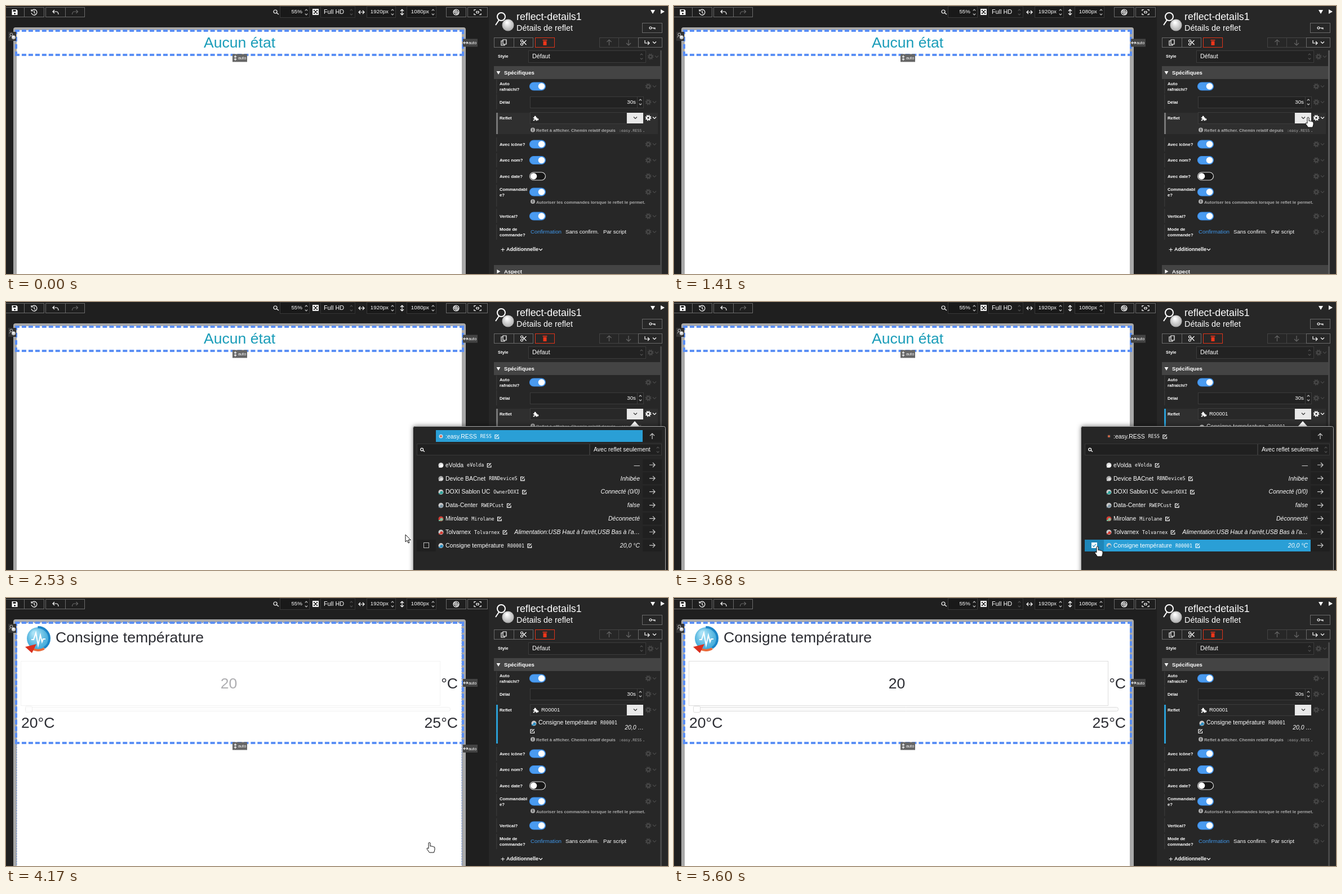
Animation, 1175 px wide and 477 px high, one loop 7.01 s. Source, as an HTML page with a canvas:

```html
<!DOCTYPE html>
<html lang="fr">
<head>
<meta charset="utf-8">
<title>Détails de reflet</title>
<style>
html, body { margin: 0; width: 100%; height: 100%; overflow: hidden; background: #1f1f1f; }
canvas { display: block; }
</style>
</head>
<body>
<canvas id="stage" width="1175" height="477"></canvas>
<script>
const LOOP = 7010, STEP = 70, PICK = 3680, OPEN = 1670;
const BLUE = '#2a9fd6', SELECT = '#5a8ff5', INK = '#2c2d33', DIM = '#484848';
const ctx = document.getElementById('stage').getContext('2d');

const ICON = {
  down: 'M-3-1.5L0 1.5L3-1.5',
  spin: 'M-2.5-3L0-5.5L2.5-3M-2.5 3L0 5.5L2.5 3',
  right: 'M-5 0H5M1-4L5 0L1 4',
  up: 'M0 5V-5M-4-1L0-5L4-1',
  dn: 'M0 5V-5M-4 1L0 5L4 1',
  wide: 'M-5 0H5M-2-3L-5 0L-2 3M2-3L5 0L2 3',
  tall: 'M0-5V5M-3-2L0-5L3-2M-3 2L0 5L3 2',
  edit: 'M1-3H-3V3.5H3.5V0M-1 1L3.5-3.5',
  search: 'M2 0A3 3 0 1 1-4 0A3 3 0 1 1 2 0M1 2L5 5',
  puzzle: 'M-5-2H-2.5A2 2 0 1 1 .5-2H3V.5A2 2 0 1 1 3 3.5V5H.5A1.5 1.5 0 1 0-2 5H-5V2.5A1.5 1.5 0 1 0-5 0Z',
  save: 'M-5-5H3L5-3V5H-5ZM-3-4V-1H2V-4ZM0 1A1.5 1.5 0 1 0 .1 1Z',
  history: 'M-4-3A5 5 0 1 1-5 1M-5-5V-2H-2M0-3V1L2 2',
  undo: 'M-2-4L-5-1L-2 2M-5-1H1Q5-1 5 4',
  redo: 'M2-4L5-1L2 2M5-1H-1Q-5-1-5 4',
  copy: 'M-2-5H4V3H-2ZM-2-3H-5V5H1V3',
  scissors: 'M-1-3A2 2 0 1 1-5-3A2 2 0 1 1-1-3M-1 3A2 2 0 1 1-5 3A2 2 0 1 1-1 3M-1-2L5 4M-1 2L5-4',
  trash: 'M-4-5H4V-3.5H-4ZM-3-2.5H3V5H-3Z',
  enter: 'M-4-4V1H4M1-2L4 1L1 4',
  key: 'M-1 0A2 2 0 1 1-5 0A2 2 0 1 1-1 0H5V2.5M3 0V2',
  rotate: 'M5 0A5 5 0 1 1-5 0A5 5 0 1 1 5 0M-3-3L4 4M-1-4L4 1M-4-1L1 4',
  expand: 'M-6-2V-4.5H-3M6-2V-4.5H3M-6 2V4.5H-3M6 2V4.5H3M-2-1.5H2V1.5H-2Z',
  check: 'M-3 0L-1 2.5L3-2.5',
  triDown: 'M-4-3H4L0 4Z',
  triRight: 'M-3-4V4L4 0Z',
  arrow: 'M0 0V13L3 10.2L5 15L7 14.2L5 9.6H9.3Z',
  hand: 'M0 1Q1.5-1 3 1V7Q5 5.5 6 7.3Q8 6.2 8.7 8Q11 7.2 11 10V13L9.5 18H1.5L-3 11.5Q-3 9-.5 10.5L0 11Z'
};

// [time, x, y] of the pointer's hot spot
const POINTER = [[780, 1075, 468], [1060, 1103, 335], [1250, 1121, 222], [1410, 1124, 198], [1980, 1124, 198],
  [2190, 985, 275], [2400, 762, 385], [2530, 709, 414], [2670, 718, 444], [2880, 738, 451], [3150, 750, 435],
  [4910, 750, 435], [5120, 835, 442], [5330, 1010, 466], [5400, 1060, 490]];

const DEVICES = [
  ['eVolda', 'eVolda', '—', '#ddd', '#fff'],
  ['Device BACnet', 'RBNDeviceS', 'Inhibée', '#aaa', '#ddd'],
  ['DOXI Sablon UC', 'OwnerDOXI', 'Connecté (0/0)', '#ccc', '#2fa39a'],
  ['Data-Center', 'RWEPCust', 'false', '#ccc', '#7f97a5'],
  ['Mirolane', 'Mirolane', 'Déconnecté', '#d43c34', '#7fc3a0'],
  ['Tolvarnex', 'Tolvarnex', "Alimentation:USB Haut à l'arrêt,USB Bas à l'a…", '#ccc', '#d43c34'],
  ['Consigne température', 'R00001', '20,0 °C', '#ccc', '#2b8fc4']
];

// label lines, centre, top, bottom, kind
const ROWS = [
  [['Auto', 'rafraîchi?'], 143, 131, 156, 'on'],
  [['Délai'], 171, 157, 184, 'delay'],
  [['Reflet'], 199, 190, 228, 'reflect'],
  [['Avec icône?'], 246, 234, 259, 'on'],
  [['Avec nom?'], 274.5, 262, 287, 'on'],
  [['Avec date?'], 303, 291, 315, 'off'],
  [['Commandabl', 'e?'], 331, 318, 357, 'on'],
  [['Vertical?'], 374, 361, 386, 'on'],
  [['Mode de', 'commande?'], 402, 389, 416, 'mode']
];

function box(x, y, w, h, fill, stroke, width = 1) {
  if (fill) { ctx.fillStyle = fill; ctx.fillRect(x, y, w, h); }
  if (stroke) { ctx.strokeStyle = stroke; ctx.lineWidth = width; ctx.strokeRect(x + .5, y + .5, w - 1, h - 1); }
}

function round(x, y, w, h, r, fill, stroke, width = 1) {
  ctx.beginPath();
  ctx.roundRect(x, y, w, h, r);
  ctx.fillStyle = fill;
  ctx.fill();
  if (stroke) { ctx.strokeStyle = stroke; ctx.lineWidth = width; ctx.stroke(); }
}

const disc = (x, y, r, fill, stroke, width) => round(x - r, y - r, 2 * r, 2 * r, r, fill, stroke, width);

// A line of dashes that starts and ends with a whole dash
function dashes(x0, y0, x1, y1, width) {
  const length = Math.hypot(x1 - x0, y1 - y0), dash = 2 * width;
  const count = Math.round((length + width) / (dash + width));
  ctx.setLineDash(count > 1 ? [dash, (length - count * dash) / (count - 1)] : []);
  ctx.lineWidth = width;
  ctx.beginPath();
  ctx.moveTo(x0, y0);
  ctx.lineTo(x1, y1);
  ctx.stroke();
  ctx.setLineDash([]);
}

function dashedFrame(x, y, w, h, color, width) {
  const m = width / 2;
  ctx.strokeStyle = color;
  dashes(x, y + m, x + w, y + m, width);
  dashes(x, y + h - m, x + w, y + h - m, width);
  dashes(x + m, y, x + m, y + h, width);
  dashes(x + w - m, y, x + w - m, y + h, width);
}

// y is the middle of the capitals; returns the right end
function text(s, x, y, size, color = '#fff', align = 'left', style = '', family = '"Liberation Sans", Arial, sans-serif') {
  ctx.font = `${style} ${size}px ${family}`;
  ctx.textAlign = align;
  ctx.fillStyle = color;
  ctx.fillText(s, x, y + size * .35);
  return x + ctx.measureText(s).width;
}

const bold = (s, x, y, color, size = 7.75) => text(s, x, y, size, color, 'left', 'bold');
const mono = (s, x, y, size, color) => text(s, x, y, size, color, 'left', '', '"DejaVu Sans Mono", monospace');

function icon(name, x, y, color = '#fff', filled = false, scale = 1, width = 1.2) {
  ctx.save();
  ctx.translate(x, y);
  ctx.scale(scale, scale);
  const path = new Path2D(ICON[name]);
  ctx.fillStyle = ctx.strokeStyle = color;
  ctx.lineWidth = width;
  filled ? ctx.fill(path, 'evenodd') : ctx.stroke(path);
  ctx.restore();
}

function button(x, y, w, name, color = '#fff', filled, border = '#6a6a6a') {
  box(x, y, w, 18, null, border);
  icon(name, x + w / 2, y + 9, color, filled);
}

function gear(x, y, color) {
  ctx.strokeStyle = color;
  ctx.lineWidth = 2;
  for (const [r, dash] of [[2.8, []], [4.4, [1.8, 1.65]]]) {
    ctx.setLineDash(dash);
    ctx.beginPath();
    ctx.arc(x, y, r, 0, 7);
    ctx.stroke();
  }
  ctx.setLineDash([]);
  icon('down', x + 11, y, color);
}

function toggle(y, on) {
  round(929.5, y - 7, 28, 14, 7, on ? '#4a9bf0' : '#161616', on ? '#3d8de6' : '#ddd', 1.2);
  disc(on ? 950.5 : 936.5, y, 5.8, '#fff');
}

function info(s, y) {
  disc(935, y - 1, 4, '#aaa');
  bold('i', 934, y - 1, '#222', 7);
  return bold(s, 941, y, '#aaa');
}

function smallIcon(x, y, base, tint) {
  disc(x, y, 4.5, base);
  disc(x + 1, y + 1, 2.6, tint);
  box(x - 4, y + 2, 3, 2, tint);
}

function lens(x, y, k) {
  ctx.save();
  ctx.translate(x, y);
  ctx.scale(k, k);
  ctx.strokeStyle = '#fff';
  ctx.lineWidth = 2;
  ctx.beginPath();
  ctx.arc(10, 8, 7, 0, 7);
  ctx.moveTo(6, 14);
  ctx.lineTo(0, 23);
  ctx.stroke();
  const shine = ctx.createRadialGradient(20, 18, 1, 22, 22, 12);
  shine.addColorStop(0, '#fff');
  shine.addColorStop(1, '#aaa');
  disc(22, 23, 10.5, shine);
  ctx.restore();
}

function toolbar() {
  button(-2, 2, 35, 'save', '#fff', true);
  button(32, 2, 36, 'history');
  button(70, 2, 36, 'undo');
  button(105, 2, 35, 'redo', '#666');
  icon('search', 479, 10);
  for (const [x, w, s] of [[486, 53, '55%'], [640, 52, '1920px'], [711, 53, '1080px']]) {
    box(x, 0, w, 21, '#191919', '#383838');
    text(s, x + w - 13, 10, 9.8, '#fff', 'right');
    icon('spin', x + w - 6, 11, '#ccc', false, .9);
  }
  box(544, 5, 11, 11, '#eee');
  for (const [x, y] of [[546, 7], [551, 7], [546, 12], [551, 12]]) box(x, y, 2, 2, '#222');
  box(548, 9, 3, 3, '#222');
  box(558, 0, 62, 21, '#1c1c1c', '#333');
  text('Full HD', 564, 10.5, 10.8);
  icon('spin', 613, 11, '#555', false, .9);
  icon('wide', 631, 11);
  icon('tall', 703, 11);
  button(781, 2, 36, 'rotate');
  button(819, 2, 36, 'expand');
}

function tag(x, y, name, fill) {
  box(x, y - 7, 26, 14, fill);
  icon(name, x + 5, y, '#fff', false, .75, 1.4);
  text('auto', x + 10, y, 7.3);
}

function thermoIcon() {
  const ball = ctx.createRadialGradient(50, 62, 3, 57, 72, 24);
  ball.addColorStop(0, '#a9e2f6');
  ball.addColorStop(1, '#2c9fd4');
  disc(57, 72, 20, ball);
  ctx.strokeStyle = '#1d86c8';
  ctx.lineWidth = 4;
  ctx.beginPath();
  ctx.arc(57, 72, 20, -1.6, 1);
  ctx.stroke();
  ctx.strokeStyle = '#e86a3a';
  ctx.beginPath();
  ctx.arc(57, 73, 20, 1, 2.2);
  ctx.stroke();
  ctx.fillStyle = '#d9301f';
  ctx.fill(new Path2D('M34 87L54 82L46 98Z'));
  ctx.strokeStyle = '#fff';
  ctx.lineWidth = 2;
  ctx.stroke(new Path2D('M45 74H49L53 62L57 84L61 66L64 78L66 73H70'));
}

function widget(alpha) {
  thermoIcon();
  text('Consigne température', 88, 70, 26.6, INK);
  ctx.globalAlpha = alpha;
  box(26, 112, 745, 80, '#fff', '#ddd');
  text('20', 395.5, 152, 26.6, INK, 'center');
  round(34.5, 194.5, 754, 7, 3, '#fafafa', '#ddd');
  round(34.5, 192.5, 12, 11, 2, '#fff', '#ddd');
  ctx.globalAlpha = 1;
  text('°C', 802, 152, 26.6, INK, 'right');
  text('20°C', 27, 222, 26.6, INK);
  text('25°C', 802, 222, 26.6, INK, 'right');
}

function page(phase, hovered) {
  round(13, 38, 803, 460, 4, '#a9a9a9');
  box(19, 43, 790, 450, '#fff');
  const bottom = phase < 2 ? 87 : phase < 5 ? 47.5 : 258;
  if (phase < 2) text('Aucun état', 414.5, 65, 26.6, '#1b9db9', 'center');
  if (phase >= 5) widget(Math.min(1, (phase - 4.8) * .175));
  if (hovered) {
    dashedFrame(18, 43, 792, 450, '#7c93c4', 1.5);
    tag(811, 268, 'wide', '#444');
  }
  dashedFrame(16, 42, 797, bottom - 40, SELECT, 4);
  tag(402, bottom + 5.5, 'tall', '#666');
  tag(811, (bottom + 44) / 2, 'wide', '#444');
  box(4, 46, 14, 16, '#333');
  lens(6, 48, .34);
}

function panelHeader() {
  lens(869, 11, 1);
  text('reflect-details1', 906, 18.5, 17.8);
  text('Détails de reflet', 906, 38.5, 14.4);
  icon('triDown', 1148, 10, '#fff', true);
  icon('triRight', 1165, 10, '#fff', true);
  button(1129, 30, 36, 'key');
  button(866, 56, 36, 'copy');
  button(901, 56, 35, 'scissors');
  button(939, 56, 35, 'trash', '#f0351a', true, '#e0341a');
  button(1053, 56, 35, 'up', '#666', false, '#444');
  button(1087, 56, 36, 'dn', '#666', false, '#444');
  box(1122, 56, 43, 18, null, '#6a6a6a');
  icon('enter', 1138, 65);
  icon('down', 1151, 65);
  bold('Style', 873, 89.5);
  box(927, 79, 209, 22, '#222', '#3c3c3c');
  text('Défaut', 934, 89.5, 10.8);
  icon('spin', 1128, 90, '#555', false, .9);
  gear(1144, 90, DIM);
}

function section(title, y, name) {
  box(866, y, 295, 23, '#444');
  icon(name, 874, y + 11.5, '#fff', true, .85);
  bold(title, 884, y + 11.5, '#fff', 9.6);
}

function reflectField(y, chosen) {
  box(930, y - 10, 172, 21, '#282828', '#3c3c3c');
  icon('puzzle', 940, y + 1, '#fff', true, .85);
  box(1102, y - 9, 29, 19, '#e9e9e9');
  icon('down', 1117, y, '#333');
  if (chosen) {
    text('R00001', 950, y, 9.5);
    smallIcon(937, 223, '#ccc', '#2b8fc4');
    text('Consigne température', 945, 221.5, 10.5);
    mono('R00001', 1055, 222, 8.3);
    icon('edit', 934, 237);
    text('20,0 …', 1132, 230, 10.5, '#fff', 'right', 'italic');
  }
  const helpY = chosen ? 252.5 : 221.5;
  info('Reflet à afficher. Chemin relatif depuis', helpY);
  mono(':easy.RESS', 1088, helpY, 6.7, '#aaa');
  bold('.', 1131, helpY, '#aaa');
}

function panel(chosen, hoverAt, barHot) {
  box(857, 0, 318, 477, '#272727');
  panelHeader();
  section('Spécifiques', 107, 'triDown');
  ROWS.forEach(([lines, mid, top, bottom, kind], i) => {
    const shift = chosen && i > 2 ? 31 : 0, y = mid + shift;
    const end = bottom + shift + (chosen && i === 2 ? 31 : 0);
    const hot = hoverAt >= top + shift && hoverAt <= end;
    if (hot) box(870, top + shift, 287, end - top - shift, '#2f2f2f');
    const picked = chosen && kind === 'reflect';
    box(870, top + shift, hot || picked ? 3 : 1.5, end - top - shift, picked ? BLUE : hot ? '#777' : '#363636');
    lines.forEach((s, n) => bold(s, 876, y + (n - (lines.length - 1) / 2) * 9.6));
    gear(1140, y, hot ? '#fff' : DIM);
    if (kind === 'on' || kind === 'off') toggle(y, kind === 'on');
    if (kind === 'delay') {
      box(930, 161, 202, 21, '#222', '#3c3c3c');
      box(1120, 162, 1, 19, '#3c3c3c');
      text('30s', 1118, y, 9.8, '#fff', 'right');
      icon('spin', 1126, y, '#ccc', false, .9);
    }
    if (kind === 'reflect') reflectField(y, chosen);
    if (kind === 'mode') {
      text('Confirmation', 931, y, 9.7, '#3f97ea');
      text('Sans confirm.', 993, y, 9.7);
      text('Par script', 1060, y, 9.7);
    }
  });
  const shift = chosen ? 31 : 0;
  info('Autoriser les commandes lorsque le reflet le permet.', 349 + shift);
  text('+', 878, 433 + shift, 13);
  icon('down', bold('Additionnelle', 888, 433 + shift, '#fff', 9) + 4, 433.5 + shift);
  section('Aspect', 461 + shift, 'triRight');
  box(1161, 79, 3, 398, barHot ? '#5a5a5a' : '#484848');
}

function named(name, code, y, ink) {
  const end = mono(code, text(name, 780, y, 10.5, ink) + 6, y + .5, 8.4, ink);
  icon('edit', end + 9, y + .5, ink);
}

function popup(alpha, chosen, cellHot) {
  const ghost = alpha < .3, ink = ghost ? '#000' : '#fff';
  ctx.save();
  ctx.globalAlpha = alpha;
  ctx.fillStyle = ink;
  ctx.fill(new Path2D('M1108 221L1116 212L1124 221Z'));
  if (!ghost) { ctx.shadowColor = '#0008'; ctx.shadowBlur = 8; }
  round(723, 221, 448, 270, 3, '#262626');
  ctx.shadowBlur = 0;
  if (!ghost) round(722.5, 221.5, 448, 270, 3, '#262626', '#aaa');
  if (!chosen) box(763, 228, 367, 21, BLUE);
  disc(772, 239, 3.5, chosen ? '#333' : '#cde');
  disc(772, 239, 2, '#d96b4a');
  named(':easy.RESS', 'RESS', 239, ink);
  box(1130, 228, 34, 21, '#202020');
  icon('up', 1147, 239, ghost ? ink : '#ccc');
  box(729, 252, 307, 21, '#202020', '#383838');
  icon('search', 739, 262.5, ink, false, .8, 1.6);
  box(1036, 252, 128, 21, '#202020', '#383838');
  text('Avec reflet seulement', 1043, 262.5, 10.5, ink);
  icon('spin', 1157, 263, '#555', false, .9);
  DEVICES.forEach(([name, code, value, base, tint], i) => {
    const y = 290 + i * 23.85, last = i === 6;
    if (last) {
      box(729, 423, 34, 21, chosen ? '#1f86b8' : cellHot ? '#363636' : '#202020');
      if (chosen) box(763, 423, 367, 21, BLUE);
      box(741, 428, 10, 10, chosen ? '#fff' : null, chosen ? ink : '#bbb');
      if (chosen) icon('check', 746, 433, '#1f86b8');
    }
    smallIcon(772, y + .5, base, tint);
    named(name, code, y, ink);
    text(value, 1125, y, 10.5, ink, 'right', 'italic');
    box(1130, Math.round(y - 10.5), 34, 21, '#202020');
    icon('right', 1147, y, ghost ? ink : '#ccc');
  });
  ctx.restore();
}

function pointerAt(t) {
  const i = POINTER.findIndex(p => p[0] > t);
  if (i < 1) return null;
  const [t0, x0, y0] = POINTER[i - 1], [t1, x1, y1] = POINTER[i];
  const u = (t - t0) / (t1 - t0);
  return { x: x0 + (x1 - x0) * u, y: y0 + (y1 - y0) * u };
}

function drawPointer({ x, y }, hand) {
  const name = hand ? 'hand' : 'arrow';
  icon(name, x, y, '#fff', true);
  icon(name, x, y, '#111', false, 1, 1);
}

function draw(t) {
  const step = 10 + STEP * Math.floor((t - 10) / STEP);
  const phase = Math.floor((t - PICK) / STEP);
  const pointer = pointerAt(step);
  const chosen = t >= PICK;
  const overPanel = pointer && pointer.x > 857 && (t < OPEN || t > 4980);
  const hoverAt = overPanel ? Math.max(pointer.y, t < OPEN && pointer.y < 230 ? 199 : 0)
    : t < 780 || (t >= OPEN && phase < 3) ? 199 : -1;
  const opacity = t < OPEN ? 0 : phase < 1 ? 1 : [0, .5, .08][phase] || 0;

  box(0, 0, 1175, 477, '#1f1f1f');
  toolbar();
  page(phase, phase >= 5 && pointer && pointer.x < 816);
  panel(chosen, hoverAt, overPanel || (t > 5190 && t < 5600));
  if (opacity) popup(opacity, chosen, step >= 2880);
  if (pointer) {
    const onButton = t < 2000 && pointer.x > 1101 && pointer.y < 210;
    drawPointer(pointer, onButton || (step >= 2810 && pointer.x < 816));
  }
}

function tick() {
  draw(performance.now() % LOOP);
  requestAnimationFrame(tick);
}
tick();
</script>
</body>
</html>
```
